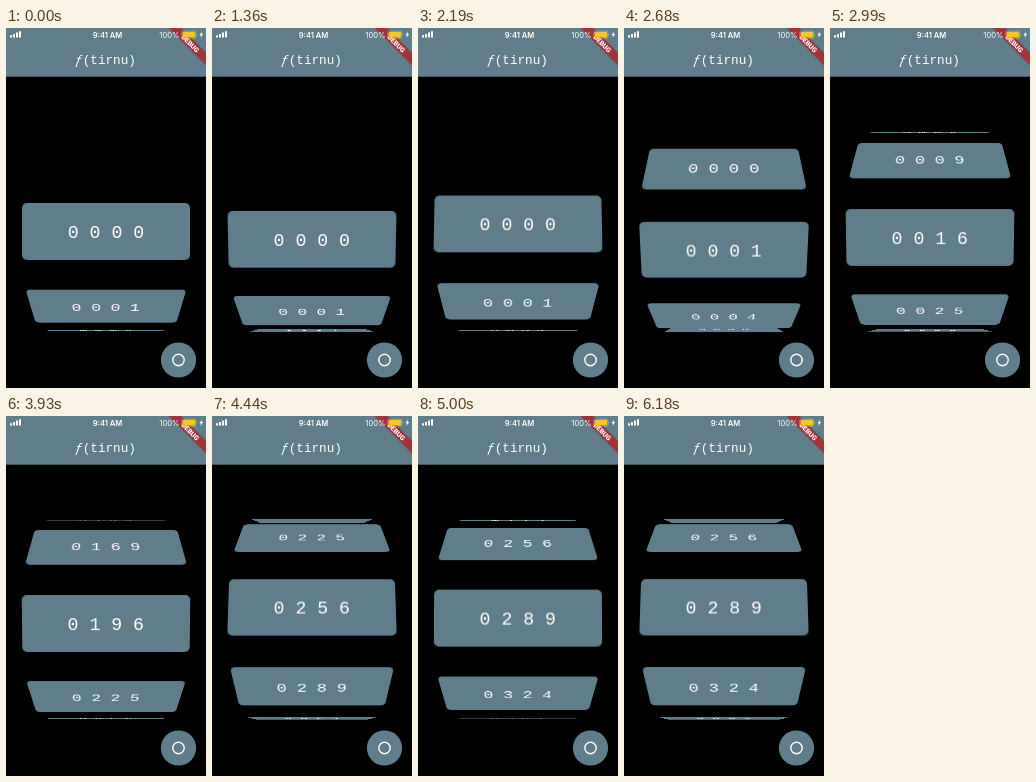
Animation, 200 px wide and 360 px high, one loop 6250 ms. Source, as an HTML page:

```html
<!DOCTYPE html>
<html lang="en">
<head>
<meta charset="utf-8">
<title>Squares wheel</title>
<style>
  html, body { margin: 0; width: 100%; height: 100%; overflow: hidden; background: #000; }
  #stage { position: relative; width: 200px; height: 360px; overflow: hidden; background: #000; }
  svg { position: absolute; left: 0; top: 0; }
  .tile {
    position: absolute; left: 16.2px; top: 175.3px; width: 167.6px; height: 57px;
    border-radius: 5px; background: #607d8b; color: #fff;
    box-shadow: 0 1px 2px rgba(0, 0, 0, .45);
    font: 18.2px/60px "Liberation Mono", "DejaVu Sans Mono", monospace;
    text-align: center; white-space: pre; transform-origin: 50% 50%;
  }
</style>
</head>
<body>
<div id="stage">
  <div id="wheel"></div>
  <svg width="200" height="360" viewBox="0 0 200 360">
    <rect width="200" height="48.7" fill="#607d8b"/>
    <text x="99.5" y="36" fill="#fff" font-size="12.7" text-anchor="middle"
      font-family="Liberation Mono, DejaVu Sans Mono, monospace"><tspan font-style="italic">ƒ</tspan>(tirnu)</text>

    <circle cx="172.5" cy="332" r="17.6" fill="#607d8b"/>
    <circle cx="172.5" cy="332" r="5.7" fill="none" stroke="#fff" stroke-width="1.4"/>

    <g transform="translate(200 0) rotate(45)">
      <rect x="-28" y="17.2" width="56" height="9.6" fill="#000" opacity=".15"/>
      <rect x="-27" y="17.8" width="54" height="8.4" fill="#a5313a"/>
      <text y="24.6" fill="#fff" font-size="6.8" font-weight="900" text-anchor="middle"
        font-family="Roboto, Inter, sans-serif">DEBUG</text>
    </g>

    <g fill="#fff" font-family="Inter, Roboto, sans-serif" font-size="7.6">
      <path d="M4 7.2h2v2.3h-2zM7 6h2v3.5h-2zM10 4.6h2v4.9h-2zM13 3.2h2v6.3h-2z"/>
      <text x="101.5" y="9.6" font-weight="600" text-anchor="middle">9:41 AM</text>
      <text x="173.5" y="9.6" text-anchor="end">100%</text>
      <rect x="175.7" y="3.2" width="14.2" height="7" rx="1.5" fill="none" stroke="#fff" stroke-width=".5" opacity=".6"/>
      <rect x="176.5" y="4" width="12.6" height="5.4" rx=".8" fill="#f5c823"/>
      <path d="M190.6 5.5q1.2 1.2 0 2.4z" opacity=".7"/>
      <path d="M196 3.4l-2.6 3.8h1.7l-.7 2.8 2.8-3.9h-1.7z"/>
    </g>
  </svg>
</div>
<script>
  const LOOP = 6250;
  const RADIUS = 156;
  const DEPTH = 0.00475;                  // perspective per pixel
  const STEP = Math.PI * 57 / 312;        // angle between neighbours
  const REACH = 3;

  // Drag: time (s), position (items), velocity (items/s)
  const DRAG = [
    [0, 0, 0], [0.7, 0, 0], [1.36, -0.09, 0], [1.8, 0, 0],
    [2.68, 0.787, 2.5], [2.9, 2.41, 17.4]
  ];
  const FLING_END = 5.611;
  const REST = 17.14;

  const wheel = document.getElementById("wheel");
  const tiles = Array.from({ length: 2 * REACH + 1 }, () => {
    const tile = document.createElement("div");
    tile.className = "tile";
    return wheel.appendChild(tile);
  });

  function hermite([t0, p0, v0], [t1, p1, v1], t) {
    const d = t1 - t0, u = (t - t0) / d, u2 = u * u, u3 = u2 * u;
    return p0 * (2 * u3 - 3 * u2 + 1) + v0 * d * (u3 - 2 * u2 + u)
      + p1 * (3 * u2 - 2 * u3) + v1 * d * (u3 - u2);
  }

  function position(t) {
    const next = DRAG.findIndex(key => key[0] > t);
    if (next > 0) return hermite(DRAG[next - 1], DRAG[next], t);
    return REST - Math.pow(0.855 * Math.max(0, FLING_END - t), 3.2);
  }

  // Cylinder projection, as a CSS matrix
  function project(angle) {
    const s = Math.sin(angle), c = Math.cos(angle);
    const m = [
      1, 0, 0, 0,
      0, c, 0, DEPTH * s,
      0, 0, 1, 0,
      0, RADIUS * s, 0, 1 + DEPTH * RADIUS * (1 - c)
    ];
    return `matrix3d(${m.map(v => v.toFixed(7)).join(",")})`;
  }

  function draw(ms) {
    const pos = position(ms / 1000);
    const first = Math.round(pos) - REACH;
    tiles.forEach((tile, i) => {
      const n = first + i;
      const angle = (n - pos) * STEP;
      const shown = n >= 0 && Math.abs(angle) <= Math.PI / 2;
      tile.style.display = shown ? "block" : "none";
      if (!shown) return;
      const label = [...String(n * n).padStart(4, "0")].join(" ");
      if (tile.textContent !== label) tile.textContent = label;
      tile.style.transform = project(angle);
    });
  }

  const start = performance.now();
  function tick() {
    draw((performance.now() - start) % LOOP);
    requestAnimationFrame(tick);
  }
  tick();
</script>
</body>
</html>
```
